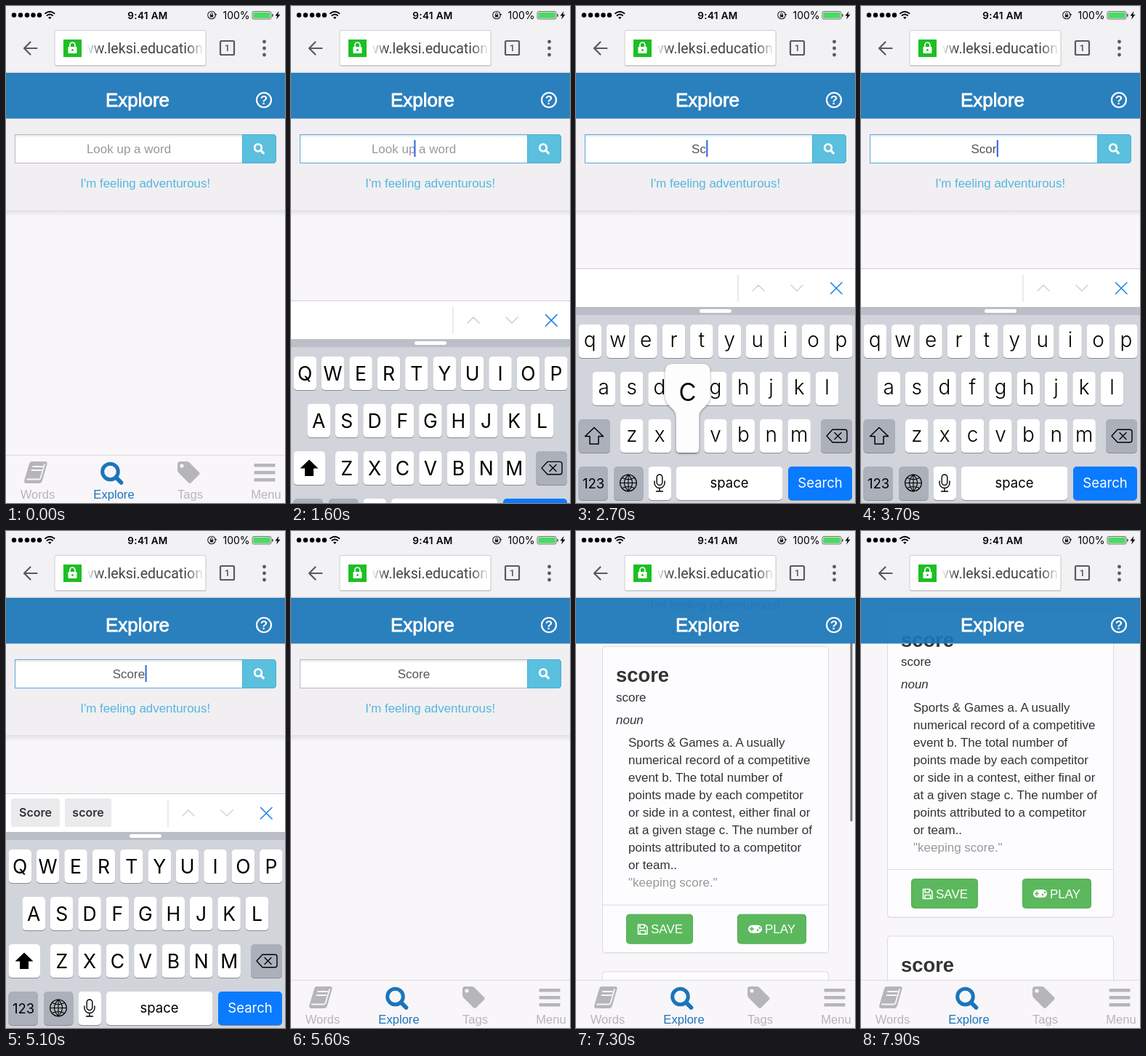
These frames come from a looping animation (384 px wide and 682 px high, 8000 ms). An HTML page:

```html
<!DOCTYPE html>
<html lang="en">
<head>
<meta charset="utf-8">
<title>Explore</title>
<style>
html, body { margin: 0; width: 100%; height: 100%; overflow: hidden; background: #f8f6f9; }
svg { display: block; width: 100vw; height: 100vh; }
text { font-family: "Liberation Sans", Arial, sans-serif; font-size: 17px; fill: #333; }
.mid { text-anchor: middle; }
.ui { font-family: Inter, Roboto, sans-serif; fill: #000; }
.tab { font-size: 16.6px; }
.line { fill: none; stroke-linecap: round; stroke-linejoin: round; }
</style>
</head>
<body>
<svg id="stage" viewBox="0 0 384 682"></svg>
<script>
const LOOP = 8000;
const FOCUS = 1420, SEARCH = 4600, BLUR = 5180, HIDDEN = 5560;
const PRESSES = [['S', 2200], ['c', 2620], ['o', 3080], ['r', 3460], ['e', 3840]];
const HOLD = 130;
const PAPER = '#f8f6f9';

const rect = (x, y, w, h, fill, r = 0, more = '') =>
  `<rect x="${x}" y="${y}" width="${w}" height="${h}" rx="${r}" fill="${fill}" ${more}/>`;
const circle = (x, y, r, fill, more = '') => `<circle cx="${x}" cy="${y}" r="${r}" fill="${fill}" ${more}/>`;
const path = (d, fill, more = '') => `<path d="${d}" fill="${fill}" ${more}/>`;
const line = (d, stroke, w, more = '') =>
  `<path class="line" d="${d}" stroke="${stroke}" stroke-width="${w}" ${more}/>`;
const text = (x, y, s, cls = '', style = '', id = '') =>
  `<text ${id && `id="${id}"`} x="${x}" y="${y}" class="${cls}" style="${style}">${s}</text>`;
const group = (id, body) => `<g id="${id}">${body}</g>`;
const magnifier = (x, y, r, w, color, reach) =>
  circle(x, y, r, 'none', `stroke="${color}" stroke-width="${w}"`) +
  line(`M${x + r * .8} ${y + r * .8}L${x + reach} ${y + reach}`, color, w * 1.15);

const DEFS = `<defs>
  <linearGradient id="fadeL"><stop stop-color="#fff"/><stop offset="1" stop-color="#fff" stop-opacity="0"/></linearGradient>
  <linearGradient id="fadeR"><stop stop-color="#fff" stop-opacity="0"/><stop offset="1" stop-color="#fff"/></linearGradient>
  <linearGradient id="shade" x2="0" y2="1"><stop stop-color="#000" stop-opacity=".09"/><stop offset="1" stop-color="#000" stop-opacity="0"/></linearGradient>
  <clipPath id="urlClip"><rect x="112" y="36" width="160" height="44"/></clipPath>
</defs>`;

function searchPanel() {
  return rect(0, 280, 384, 9, 'url(#shade)') + rect(0, 90, 384, 190, '#f1eff2') +
    `<rect id="field" x="12.5" y="176.5" width="313" height="39" fill="#fff" stroke="#b9b9bc"/>` +
    rect(13, 177, 312, 4, 'url(#shade)') +
    path('M325.5 176H367q5 0 5 5V211q0 5-5 5H325.5Z', '#5bbfde') +
    path('M325.5 176.5H367q4.5 0 4.5 4.5V211q0 4.5-4.5 4.500H325.5Z', 'none', 'stroke="#46b2d8"') +
    magnifier(347, 194.5, 4.8, 2.8, '#fff', 7.3) +
    text(169, 202, 'Look up a word', 'mid', 'fill:#999', 'hint') +
    text(169, 202, '', 'mid', 'fill:#555', 'value') +
    `<rect id="caret" y="184" width="2.2" height="23" fill="#3f6fe0"/>` +
    text(191.7, 249, "I'm feeling adventurous!", 'mid', 'fill:#53b7de;font-size:16.9px');
}

const MEANING = ['Sports &amp; Games a. A usually', 'numerical record of a competitive',
  'event b. The total number of', 'points made by each competitor', 'or side in a contest, either final or',
  'at a given stage c. The number of', 'points attributed to a competitor', 'or team..'];

function button(x, w, label, tx, icon) {
  return rect(x + .5, 668.5, w - 1, 40, '#5cb85c', 4, 'stroke="#4fae4f"') +
    text(tx, 694.5, label, '', 'fill:#fff') + icon;
}

function card(dy) {
  const floppy = line('M85.5 682.5h9l3.5 3.5v9.5h-12.5zM88 683v4h6v-4M88 695v-4.5h7.5v4.5', '#fff', 1.5);
  const pad = rect(237, 683, 19, 11, '#fff', 5.5) +
    line('M239.5 688.5h5M242 686v5', '#5cb85c', 1.6) + circle(250, 690, 1.3, '#5cb85c') + circle(253, 687, 1.3, '#5cb85c');
  return `<g transform="translate(0 ${dy})">` +
    rect(36.5, 302, 311, 420, '#e6e5e8', 4) +
    rect(36.5, 301, 311, 420, '#fdfcfe', 4, 'stroke="#dcdbde"') +
    text(55, 349.5, 'score', '', 'font-size:27.4px;font-weight:700') +
    text(55, 376, 'score') + text(55, 407, 'noun', '', 'font-style:italic') +
    MEANING.map((s, i) => text(72, 438.5 + 24 * i, s)).join('') +
    text(72, 630.5, '"keeping score."', '', 'fill:#999') +
    rect(37, 655, 310, 1, '#dcdbde') +
    button(69, 92, 'SAVE', 103, floppy) + button(222, 95, 'PLAY', 260, pad) + '</g>';
}

function header() {
  return rect(0, 91.5, 384, 63, '#1976b9', 0, 'fill-opacity=".92"') + rect(0, 91.5, 384, 1.2, '#1f6dab') +
    text(181, 138, 'Explore', 'mid', 'font-size:26px;fill:#fff;stroke:#fff;stroke-width:.8') +
    circle(355, 129, 10, 'none', 'stroke="#fff" stroke-width="2.2"') +
    text(355, 135, '?', 'mid', 'font-size:17px;font-weight:700;fill:#fff');
}

function chrome() {
  const dots = [11, 20, 29, 37.5, 46].map(x => circle(x, 12.5, 3.2, '#000')).join('');
  const wifi = line('M54 10.2q6.3-5 12.6 0M56.4 13q3.9-3 7.8 0', '#000', 1.8) + path('M60.3 18l-2.3-2.5q2.3-1.7 4.6 0z', '#000');
  const lock = circle(283, 12.5, 5.3, 'none', 'stroke="#222" stroke-width="1.1"') + rect(280.8, 11.8, 4.4, 3.6, '#222') +
    line('M281.6 12v-1.4a1.4 1.4 0 0 1 2.8 0v1.4', '#222', .9) + path('M286.5 11h4l-2 2.6z', '#222');
  const battery = rect(339, 7.5, 26, 10.5, 'none', 2, 'stroke="#555" stroke-width=".8"') +
    rect(340.3, 8.8, 23.4, 7.9, '#4cd964', 1) + rect(366, 10.8, 1.7, 4, '#555', .8) + path('M375.5 7l-5 6.5h3l-1.5 5 5.5-6.7h-3.2z', '#000');
  const padlock = rect(79, 46, 25, 24, '#1dbf24') + rect(85.5, 56, 12, 9, '#fff', 1) +
    line('M88 56v-2.5a3.5 3.5 0 0 1 7 0v2.5', '#fff', 1.7) + circle(91.5, 60.5, 1.4, '#1dbf24');
  return rect(0, 0, 384, 91.5, '#f2f1f4') + rect(0, 90.5, 384, 1, '#d3d8df') + dots + wifi +
    text(195, 17.5, '9:41 AM', 'ui mid', 'font-size:13.6px;font-weight:600;letter-spacing:.3px') +
    lock + text(317, 17.5, '100%', 'ui mid', 'font-size:14px') + battery +
    line('M42.5 58H25.5M33.5 49.5L25 58l8.5 8.5', '#5a5a5c', 2.2) +
    rect(67, 34.5, 208.5, 48.5, '#d2d1d4', 2) + rect(67, 33.5, 208, 48, '#fff', 2, 'stroke="#cfced1"') + padlock +
    `<g clip-path="url(#urlClip)">` + text(271, 65, 'www.leksi.education', '', 'font-family:Roboto,sans-serif;font-size:19.6px;text-anchor:end;fill:#444') + '</g>' +
    rect(111, 40, 20, 36, 'url(#fadeL)') + rect(248, 40, 25, 36, 'url(#fadeR)') +
    rect(295, 48, 19, 19, 'none', 1.5, 'stroke="#5a5a5c" stroke-width="2.2"') +
    text(304.5, 62, '1', 'mid', 'font-family:Roboto,sans-serif;font-size:13px;font-weight:500;fill:#555') +
    [49, 58, 67].map(y => circle(355.5, y, 2.4, '#5a5a5c')).join('');
}

function tabs() {
  const gray = '#b6b5b8', blue = '#1a75bb';
  const book = path('M35 625H54q3.5 0 2.5 3.5L50 651q-1 4-4.5 4H28q-4 0-2.5-5L32 628q.8-3 3-3Z', gray) +
    line('M37 632H50M35.5 637H48.5M29 649.5H45q2 0 2.6-2L53 629', PAPER, 1.8);
  const tag = path('M236 629q0-4 4-4h9q2 0 4 2l12.5 12.5q2 2 0 4l-10.5 10.5q-2 2-4 0L238 641q-2-2-2-4Z', gray) + circle(242, 631, 2.6, PAPER);
  return rect(0, 616, 384, 66, PAPER) + rect(0, 616, 384, 1, '#dedde0') + book +
    magnifier(143.5, 639, 10.8, 5, blue, 15) + tag +
    [628, 638, 648].map(y => rect(341.5, y, 29, 4.6, gray, 1)).join('') +
    [['Words', 43.5], ['Explore', 148.5], ['Tags', 253.5], ['Menu', 358]].map(([s, x]) =>
      text(x, 676, s, 'mid tab', `fill:${s === 'Explore' ? blue : gray}`)).join('');
}

const ROWS = [['qwertyuiop', 3.5, 437], ['asdfghjkl', 22.5, 502], ['zxcvbnm', 61, 567]];
const PITCH = 38.4, KEY_W = 31.5, KEY_H = 46;
const KEYS = ROWS.flatMap(([s, x, y]) => [...s].map((c, i) => ({ c, x: x + PITCH * i, y })));
const key = (x, y, w, fill = '#fff', id = '') =>
  rect(x, y + 1, w, KEY_H, '#898c91', 5) + rect(x, y, w, KEY_H, fill, 5, id && `id="${id}"`);
const letters = (font, drop, f) =>
  KEYS.map(k => text(k.x + KEY_W / 2, k.y + drop, f(k.c), 'ui mid', font)).join('');
const chip = (x, w, s) => rect(x, 367, w, 39, '#ebebee', 3) +
  text(x + w / 2, 392, s, 'ui mid', 'font-size:16px;font-weight:600;fill:#333');

function keyboard() {
  const arrow = 'M25 578.5l12.5 12h-6.5v10.5h-12v-10.5h-6.5Z', dark = '#abb0ba';
  const globe = circle(72, 654.5, 11.3, 'none', 'stroke="#000" stroke-width="1.3"') +
    line('M60.7 654.5h22.6M72 643.2v22.6M63.5 647.5q8.5 4 17 0M63.5 661.5q8.5-4 17 0M72 643.2q-11 11.3 0 22.6M72 643.2q11 11.3 0 22.6', '#000', 1.1);
  const mic = rect(111.2, 643, 7.6, 14.5, 'none', 3.8, 'stroke="#000" stroke-width="1.4"') +
    line('M108 652v2.5a7 7 0 0 0 14 0V652M115 661.5v4.5M110.5 666h9', '#000', 1.4);
  return rect(0, 360, 384, 54, '#fff') + rect(0, 360, 384, 1, '#cdccd0') + rect(222.5, 369, 1, 37, '#d5d5d8') +
    line('M243 391l8-8 8 8M296 383l8 8 8-8', '#d2d2d6', 1.5) + line('M350.5 379.5l15.5 15.5M366 379.5L350.5 395', '#1f86e4', 1.6) +
    group('chips', chip(7, 67, 'Score') + chip(81, 64, 'score')) +
    rect(0, 413, 384, 12, '#babec7') + rect(170, 416, 44, 5, '#fff', 2.5) + rect(0, 424, 384, 258, '#d1d4db') +
    KEYS.map(k => key(k.x, k.y, KEY_W)).join('') + key(3.5, 567, 43.5, '#fff', 'shift') +
    group('upper', letters('font-size:26.5px', 32.5, c => c.toUpperCase()) + path(arrow, '#000')) +
    group('lower', letters('font-size:28px;font-weight:300', 30.5, c => c) + line(arrow, '#000', 1.5)) +
    key(337, 567, 43, dark) +
    line('M345 590l8-8.7h17q3 0 3 3v11.4q0 3-3 3h-17ZM356 585.5l9 9M365 585.5l-9 9', '#000', 1.4) +
    key(3.5, 632, 40.5, dark) + text(24, 662, '123', 'ui mid', 'font-size:18.5px') +
    key(52, 632, 40.5, dark) + globe + key(99.5, 632, 31.5) + mic +
    key(138, 632, 146.5) + text(211, 660.5, 'space', 'ui mid', 'font-size:18.5px') +
    key(292, 632, 88, '#0a7aff', 'searchKey') +
    text(336, 660.5, 'Search', 'ui mid', 'font-size:18.5px;fill:#fff', 'searchLabel') +
    group('popup', path('M-20-76H20Q31-76 31-65V-32C31-17 15.75-16 15.75-3V41q0 5-5 5H-10.75q-5 0-5-5V-3C-15.75-16-31-17-31-32V-65Q-31-76-20-76Z',
      '#fdfdfe', 'style="filter:drop-shadow(0 1px 1.5px rgba(0,0,0,.4))"') +
      text(0, -25.5, '', 'ui mid', 'font-size:45px;font-weight:300', 'big'));
}

const svg = document.getElementById('stage');
svg.innerHTML = DEFS + rect(0, 0, 384, 682, PAPER) +
  group('page', searchPanel() + group('results', card(0) + card(446))) +
  header() + chrome() + `<rect id="bar" x="377.5" width="3" height="245" rx="1.5" fill="#77767a"/>` +
  group('tabs', tabs()) + group('board', keyboard());

const ui = {};
svg.querySelectorAll('[id]').forEach(e => ui[e.id] = e);

const set = (e, attrs) => { for (const k in attrs) e.setAttribute(k, attrs[k]); };
const show = (e, on) => { e.style.display = on ? '' : 'none'; };
const span = (t, a, b) => Math.min(1, Math.max(0, (t - a) / (b - a)));
const easeOut = (p, k) => 1 - (1 - p) ** k;

function draw(t) {
  const focused = t >= FOCUS && t < BLUR + 20;
  const typed = PRESSES.filter(p => t >= p[1]);
  const last = typed[typed.length - 1];

  const word = typed.map(p => p[0]).join('');
  ui.value.textContent = word;
  show(ui.hint, !word);
  ui.field.setAttribute('stroke', focused ? '#58a9dc' : '#b9b9bc');

  const beat = (t - (last ? last[1] : FOCUS)) % 1000;
  const width = word ? ui.value.getComputedTextLength() : 0;
  set(ui.caret, {
    x: 169.3 + width / 2,
    opacity: focused ? 1 - span(beat, 430, 560) + span(beat, 900, 1000) : 0
  });

  const up = t < BLUR ? easeOut(span(t, FOCUS, FOCUS + 400), 3.3) : 1 - easeOut(span(t, BLUR, HIDDEN), 2.2);
  const open = t >= FOCUS && t < HIDDEN;
  show(ui.board, open);
  show(ui.tabs, !open);
  ui.board.setAttribute('transform', `translate(0 ${322 * (1 - up)})`);

  const caps = t < 2390 || t >= SEARCH + 100;
  show(ui.upper, caps);
  show(ui.lower, !caps);
  ui.shift.setAttribute('fill', caps ? '#fff' : '#abb0ba');
  show(ui.chips, t >= 3950);

  const pressed = t >= SEARCH && t < SEARCH + 100;
  ui.searchKey.setAttribute('fill', pressed ? '#fff' : '#0a7aff');
  ui.searchLabel.style.fill = pressed ? '#000' : '#fff';

  const held = last && t < last[1] + HOLD;
  show(ui.popup, held);
  if (held) {
    const k = KEYS.find(k => k.c === last[0].toLowerCase());
    ui.popup.setAttribute('transform', `translate(${k.x + KEY_W / 2} ${k.y})`);
    ui.big.textContent = last[0];
  }

  ui.results.setAttribute('opacity', easeOut(span(t, 5900, 6620), 2));
  const scroll = 191 * easeOut(span(t, 6880, 7730), 2);
  ui.page.setAttribute('transform', `translate(0 ${-scroll})`);
  set(ui.bar, { y: 92 + scroll * .432, opacity: t < 6880 ? 0 : 1 - span(t, 7720, 7890) });
}

function tick(now) {
  draw(now % LOOP);
  requestAnimationFrame(tick);
}
draw(0);
requestAnimationFrame(tick);
</script>
</body>
</html>
```
